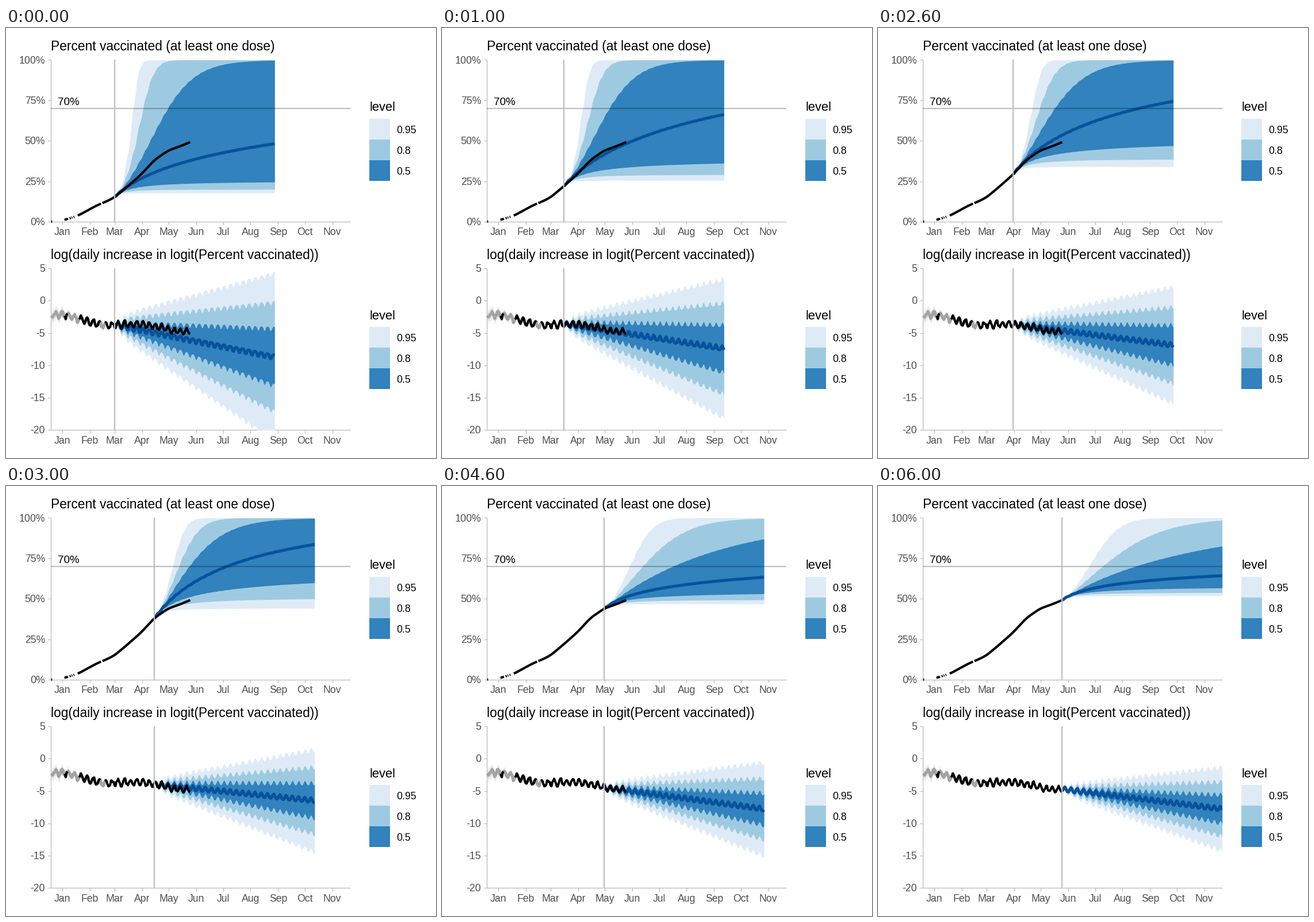
A matplotlib script for the animation above (7000 ms loop, 748x748 px).

```python
import numpy as np
import matplotlib.pyplot as plt
from matplotlib.animation import ArtistAnimation
from matplotlib.patches import Rectangle

SIZE = 748
PT = 0.72  # points per pixel at 100 dpi
LEFT, RIGHT = 78, 598.3
TOP, BASE = (55, 417.5), (336.5, 699)
BLUES = ["#DEEBF7", "#9ECAE1", "#3182BD"]
NAVY, GREY, AXIS, HISTORY = "#08519C", "#BEBEBE", "#B8B8B8", "#A3A3A3"

# Normal quantiles of the bounds; the share has a longer lower tail
Z_RATE = np.array([1.96, 1.28, 0.67, 0, -0.67, -1.28, -1.96])
Z_SHARE = np.array([1.93, 1.25, 0.67, 0, -0.67, -1.3, -2.35])
HORIZON = 180
TAU = 15  # days over which the growth rate starts to bend

plt.rcParams["font.family"] = "Liberation Sans"
fig = plt.figure(figsize=(SIZE / 100, SIZE / 100), dpi=100, facecolor="white")
ax = fig.add_axes([0, 0, 1, 1])
ax.set_xlim(-0.5, SIZE - 0.5)
ax.set_ylim(SIZE - 0.5, -0.5)
ax.axis("off")


def day_x(day):
    return 97.2 + 1.5461 * day


def share_y(share):
    return BASE[0] - (BASE[0] - TOP[0]) * share


def rate_y(rate):
    return TOP[1] + (5 - rate) * (BASE[1] - TOP[1]) / 25


def share(day):
    """Observed share: a few key days, rounded off by a moving average."""
    days = [-20, -5, 3, 18, 39, 50, 59, 74, 89, 104, 119, 134, 144, 154]
    percent = [0, 0.2, 1.2, 3.8, 10.1, 12.6, 15.1, 22, 29.3, 38.2, 43.9, 46.9, 49.2, 51.6]
    window = [np.interp(day + k, days, percent) for k in range(-4, 5)]
    return np.mean(window, axis=0) / 100


def trend(day):
    """Level of the log increase without its weekly swing."""
    days = [-12, 5, 18, 34, 50, 60, 76, 92, 105, 120, 135, 145]
    rates = [-2.1, -2.2, -2.75, -3.4, -3.9, -3.7, -3.6, -3.7, -4, -4.5, -4.8, -4.7]
    return np.interp(day, days, rates)


def weekly(day, skew=0.0):
    turn = 2 * np.pi * day / 7
    return np.cos(turn) + skew * np.cos(2 * turn)


def label(x, y, text, px, color="black", ha="left"):
    ax.text(x, y, text, fontsize=px * PT, color=color, ha=ha, va="baseline", zorder=9)


def line(xs, ys, color, px, z, **kw):
    return ax.plot(xs, ys, color=color, lw=px * PT, zorder=z,
                   solid_capstyle="butt", solid_joinstyle="round", **kw)[0]


def draw_panel(top, base, names, title):
    label(LEFT, top - 16, title, 22.7)
    line([LEFT, LEFT], [top, base], AXIS, 1.2, 1)
    line([LEFT, RIGHT], [base, base], AXIS, 1.2, 1)
    for y, name in zip(np.linspace(top, base, len(names)), names):
        line([LEFT - 5.5, LEFT], [y, y], AXIS, 1.2, 1)
        label(67.5, y + 6, name, 17.6, "#4D4D4D", "right")
    months = "Jan Feb Mar Apr May Jun Jul Aug Sep Oct Nov".split()
    firsts = np.cumsum([0, 31, 28, 31, 30, 31, 30, 31, 31, 30, 31])
    for x, name in zip(day_x(firsts), months):
        line([x, x], [base, base + 5.5], AXIS, 1.2, 1)
        label(x, base + 23.5, name, 17.6, "#4D4D4D", "center")
    label(632, top + 89, "level", 22)
    for k, name in enumerate(["0.95", "0.8", "0.5"]):
        y = top + 102.5 + 36 * k
        ax.add_patch(Rectangle((631.5, y), 36, 36, fc=BLUES[k], lw=0))
        label(679, y + 25, name, 17.8)


def draw_history():
    spans = [(-12.3, -11.3), (2.6, 6.5), (8.4, 9.7), (10.7, 11.5),
             (12.8, 13.7), (17.5, 43.7), (45.3, 144)]
    for a, b in spans:
        d = np.linspace(a, b, 80)
        line(day_x(d), share_y(share(d)), "black", 4.1, 4)

    rng = np.random.default_rng(4)
    d = np.arange(-12, 145)
    x = day_x(d)
    y = rate_y(trend(d) + 0.46 * weekly(d) + rng.normal(0, 0.12, len(d)))
    old = d <= 48
    for pad, shade in ((13, "#F0F0F0"), (7, "#DCDCDC")):
        w = pad * np.exp(-(d[old] + 12) / 35)
        ax.fill_between(x[old], y[old] - w, y[old] + w, color=shade, lw=0, zorder=1)
    line(x[old], y[old], HISTORY, 5.2, 2)
    for a, b in ((3, 6), (19, 43), (48, 144)):
        seen = (d >= a) & (d <= b)
        line(x[seen], y[seen], "black", 4, 4)


def draw_fan(x, bounds, panel):
    arts = [ax.fill_between(x, bounds[k], bounds[6 - k], color=color, lw=0, zorder=2)
            for k, color in enumerate(BLUES)]
    arts.append(line(x, bounds[3], NAVY, 5.2, 3))
    for art in arts:
        art.set_clip_path(panel)
    return arts


def share_bounds(origin, t, speed, power, spread):
    """Logit grows at speed * (1 + t / TAU) ** (n - 1), with one n per bound."""
    start = share(origin)
    t = np.maximum(t + 0.4 * np.sin(2 * np.pi * (origin + t) / 7), 0)
    bounds = []
    for n in power + spread * Z_SHARE:
        n = n if abs(n) > 1e-6 else 1e-6
        rise = speed * TAU * ((1 + t / TAU) ** n - 1) / n
        bounds.append(share_y(1 / (1 + (1 / start - 1) * np.exp(-rise))))
    return bounds


def rate_bounds(origin, t, end, spread, skew):
    u = t / HORIZON
    start = trend(origin)
    widen = spread * (0.9 * u + 0.1 * (1 - np.exp(-20 * u)))
    middle = start + (end - start) * u + 0.36 * weekly(origin + t, skew)
    return [rate_y(middle + z * widen) for z in Z_RATE]


def forecast(origin, growth, decline):
    t = np.arange(HORIZON + 1)
    x, x0 = day_x(origin + t), day_x(origin)
    arts = draw_fan(x, share_bounds(origin, t, *growth), panels[0])
    arts += draw_fan(x, rate_bounds(origin, t, *decline), panels[1])
    return arts + [line([x0, x0], [a, b], GREY, 2.2, 6) for a, b in zip(TOP, BASE)]


panels = [Rectangle((LEFT, a), RIGHT - LEFT, b - a, transform=ax.transData)
          for a, b in zip(TOP, BASE)]
draw_panel(TOP[0], BASE[0], ["100%", "75%", "50%", "25%", "0%"],
           "Percent vaccinated (at least one dose)")
draw_panel(TOP[1], BASE[1], ["5", "0", "-5", "-10", "-15", "-20"],
           "log(daily increase in logit(Percent vaccinated))")
label(90, 133.5, "70%", 18.8)
line([LEFT, RIGHT], [139.5, 139.5], "black", 2.2, 5, alpha=0.25)
draw_history()

# Origin day, (speed, power, spread) of the share, (end, spread, skew) of the rate
frames = [
    forecast(59, (0.0426, 0.0, 1.5), (-8.7, 6.6, -0.25)),
    forecast(74, (0.038, 0.21, 1.32), (-7.45, 5.5, 0.25)),
    forecast(89, (0.036, 0.25, 1.17), (-6.9, 4.6, 0.1)),
    forecast(104, (0.034, 0.35, 1.0), (-6.5, 4.05, 0.1)),
    forecast(119, (0.02, 0.03, 1.0), (-7.8, 3.7, 0.1)),
    forecast(134, (0.013, -0.02, 0.95), (-8.45, 3.45, 0.1)),
    forecast(144, (0.0163, -0.01, 0.97), (-7.8, 3.3, 0.1)),
]

anim = ArtistAnimation(fig, frames, interval=1000, repeat=True, repeat_delay=0)
plt.show()
```
